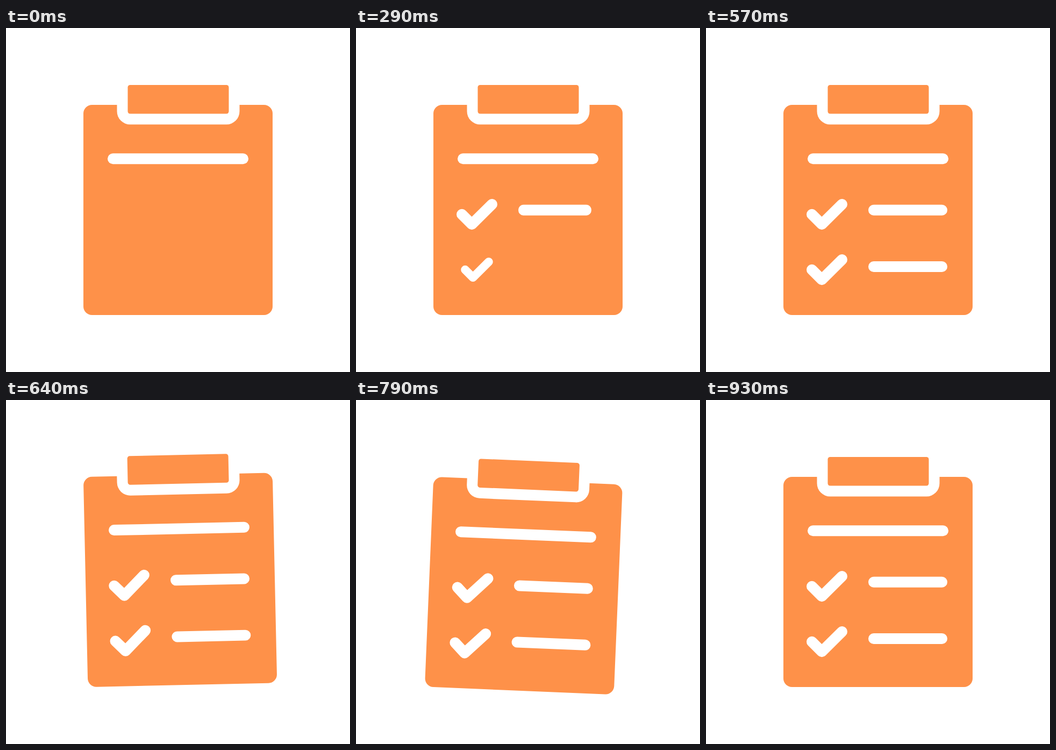
Write an HTML page that moves like this. It is 640 px wide and 640 px high and loops after 1 s.

```html
<!DOCTYPE html>
<html lang="en">
<head>
<meta charset="utf-8">
<title>Checklist</title>
<style>
  html, body { margin: 0; height: 100%; overflow: hidden; background: #fff; }
  svg { display: block; width: 100%; height: 100%; }
  .ink { fill: #fe9149; }
  .mark { fill: none; stroke: #fff; stroke-width: 20; stroke-linecap: round; stroke-linejoin: round; }
</style>
</head>
<body>
<svg viewBox="0 0 640 640">
  <g id="board">
    <rect class="ink" x="144" y="143" width="352" height="391" rx="16"/>
    <rect x="206.5" y="86" width="228" height="93.5" rx="24.5" fill="#fff"/>
    <rect class="ink" x="226.5" y="106" width="188" height="53.5" rx="4.5"/>
    <path class="mark" d="M199 243.2H441"/>
    <path class="mark" id="check1" d="M197 346.7l18.5 18.5L253 328"/>
    <path class="mark" id="line1" d="M312 338.8H439"/>
    <path class="mark" id="check2" d="M197 449.7l18.5 18.5L253 431"/>
    <path class="mark" id="line2" d="M312 444H439"/>
  </g>
</svg>
<script>
const LOOP = 1000, FPS = 14;
const pop = [0, 0.783, 1.065, 1];        // check marks overshoot, then settle
const grow = [0, 0.325, 0.925, 1];       // lines extend from their left end
const tilt = [0, -1.25, -5, 2.4, 3.75, 0];

// Value of a stepped curve that begins at a given step and holds its ends.
const at = (curve, step, start) =>
  curve[Math.max(0, Math.min(curve.length - 1, step - start))];

const set = (id, transform) =>
  document.getElementById(id).setAttribute("transform", transform);

const scale = (id, x, y, sx, sy) =>
  set(id, `translate(${x} ${y}) scale(${sx} ${sy}) translate(${-x} ${-y})`);

function draw(now) {
  // Steps fall on the 10 ms grid
  const ms = Math.floor((now % LOOP) / 10) * 10 + 5;
  const step = Math.floor(ms * FPS / 1000);
  const check1 = at(pop, step, 0), check2 = at(pop, step, 3);
  scale("check1", 225, 346.7, check1, check1);
  scale("check2", 225, 449.7, check2, check2);
  scale("line1", 302, 338.8, at(grow, step, 2), 1);
  scale("line2", 302, 444, at(grow, step, 5), 1);
  set("board", `rotate(${at(tilt, step, 8)} 150 150)`);
}

let begin;
function tick(now) {
  begin ??= now;
  draw(now - begin);
  requestAnimationFrame(tick);
}
draw(0);
requestAnimationFrame(tick);
</script>
</body>
</html>
```
